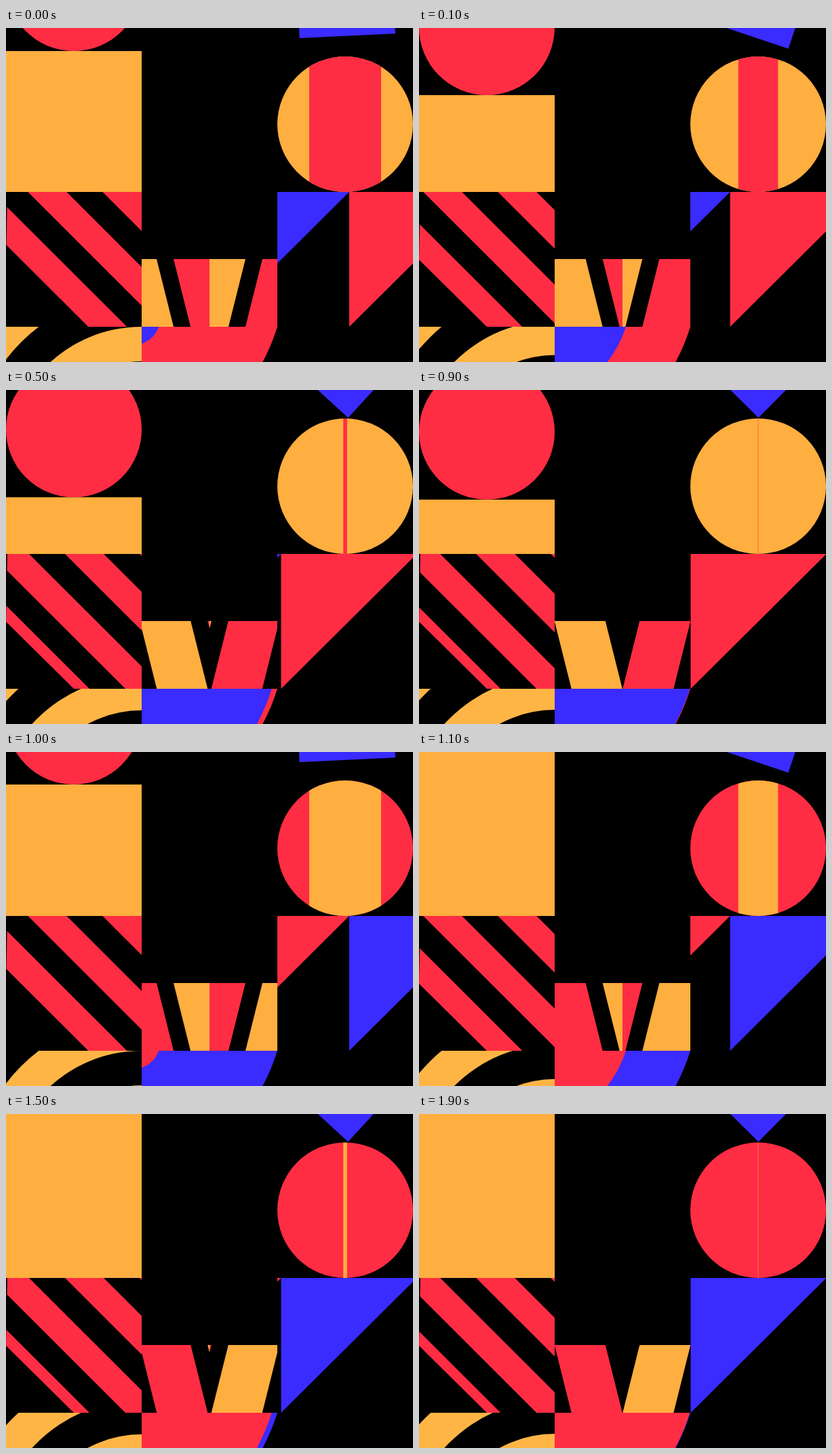
An HTML page with a canvas for the animation above (2000 ms loop, 600x493 px).

```html
<!DOCTYPE html>
<html lang="en">
<head>
<meta charset="utf-8">
<title>Geometric tiles</title>
<style>
html, body { margin: 0; width: 100%; height: 100%; overflow: hidden; background: #000; }
canvas { display: block; }
</style>
</head>
<body>
<canvas id="stage" width="600" height="493"></canvas>
<script>
const ctx = document.getElementById('stage').getContext('2d');
const RED = '#ff2d43', YELLOW = '#ffae40', BLUE = '#3a2bff', AMBER = '#ffb546';
const LOOP = 2000, HALF = 1000, STEP = 100;

function poly(color, ...pts) {
  ctx.fillStyle = color;
  ctx.beginPath();
  for (let i = 0; i < pts.length; i += 2) ctx.lineTo(pts[i], pts[i + 1]);
  ctx.closePath();
  ctx.fill();
}

function rect(color, x, y, w, h) {
  ctx.fillStyle = color;
  ctx.fillRect(x, y, w, h);
}

function disc(color, x, y, r) {
  ctx.fillStyle = color;
  ctx.beginPath();
  ctx.arc(x, y, r, 0, 2 * Math.PI);
  ctx.fill();
}

function clipTo(path, draw) {
  ctx.save();
  ctx.beginPath();
  path();
  ctx.clip();
  draw();
  ctx.restore();
}

const inRect = (x, y, w, h, draw) => clipTo(() => ctx.rect(x, y, w, h), draw);

// Exponential settling: the part of the move still left after t ms.
const left = (start, rate, t) => start * Math.exp(-rate * t / 1000);

function ballAndBlock(t, second) {
  const rem = left(128, 7.1, t);
  const top = second ? -80 + rem : 162 - rem;
  inRect(0, 0, 200, 242, () => {
    disc(RED, 100, top - 100, 100);
    rect(YELLOW, 0, top, 200, 400);
  });
}

function spinningSquare(r) {
  const pts = [];
  for (let i = 0; i < 4; i++) {
    const a = (1 - r + i) * Math.PI / 2;
    pts.push(500 + 100 * Math.cos(a), -59 + 100 * Math.sin(a));
  }
  poly(BLUE, ...pts);
}

function splitDisc(r, fresh, old) {
  disc(fresh, 500, 142, 100);
  clipTo(() => ctx.arc(500, 142, 100, 0, 2 * Math.PI),
    () => rect(old, 500 - 100 * r, 42, 200 * r, 200));
}

function slidingTriangles(r, fresh, old) {
  const tri = (color, x) => poly(color, x, 242, x + 200, 242, x, 441);
  inRect(400, 242, 200, 199, () => {
    tri(old, 200 + 200 * r);
    rect('#000', 400 + 200 * r, 242, 200, 199);
    tri(fresh, 400 + 200 * r);
  });
}

function stripes(r) {
  const outline = () => {
    ctx.moveTo(2, 242);
    ctx.lineTo(200, 242);
    ctx.lineTo(200, 441);
    ctx.lineTo(100, 441);
    ctx.lineTo(0, 342);
  };
  clipTo(outline, () => {
    for (let k = -3; k <= 2; k++) {
      const low = 268 + 110 * (k - r), high = low - 57;
      poly(RED, 0, high, 200, high + 200, 200, low + 200, 0, low);
    }
  });
}

function slantedBars(r, leftColor, rightColor) {
  const bar = (color, x, lean) =>
    poly(color, x, 341, x + 75, 341, x + 75 + lean, 441, x + lean, 441);
  inRect(200, 341, 100, 100, () => {
    bar(leftColor, 200 - 100 * r, 25);
    bar(rightColor, 300 - 100 * r, 25);
  });
  inRect(300, 341, 100, 100, () => {
    bar(rightColor, 325 + 100 * r, -25);
    bar(leftColor, 225 + 100 * r, -25);
  });
}

function growingFan(t, fresh, old) {
  const fan = (color, s) => disc(color, 200 - 90 * s, 441 - 90 * s, s * Math.hypot(290, 90));
  inRect(200, 441, 201, 52, () => {
    fan(old, 1);
    fan(fresh, 1 - left(0.875, 6.1, t));
  });
}

function rings(t, second) {
  const outer = (second ? 271 : 220) - left(20, 6.3, t);
  inRect(0, 441, 200, 52, () => {
    for (let k = 1; k >= -1; k--) {
      disc(AMBER, 200, 641, outer + 102 * k);
      disc('#000', 200, 641, outer + 102 * k - 51);
    }
  });
}

function draw(time) {
  const t = time % HALF, second = time >= HALF;
  const r = left(0.53, 5.92, t);
  const swap = (a, b) => second ? [b, a] : [a, b];
  rect('#000', 0, 0, 600, 493);
  ballAndBlock(t, second);
  spinningSquare(r);
  splitDisc(r, ...swap(YELLOW, RED));
  stripes(r);
  slantedBars(r, ...swap(YELLOW, RED));
  slidingTriangles(r, ...swap(RED, BLUE));
  rings(t, second);
  growingFan(t, ...swap(BLUE, RED));
}

const begin = performance.now();
function tick() {
  const time = (performance.now() - begin) % LOOP;
  draw(Math.floor(time / STEP) * STEP); // ten pictures a second
  requestAnimationFrame(tick);
}
tick();
</script>
</body>
</html>
```
